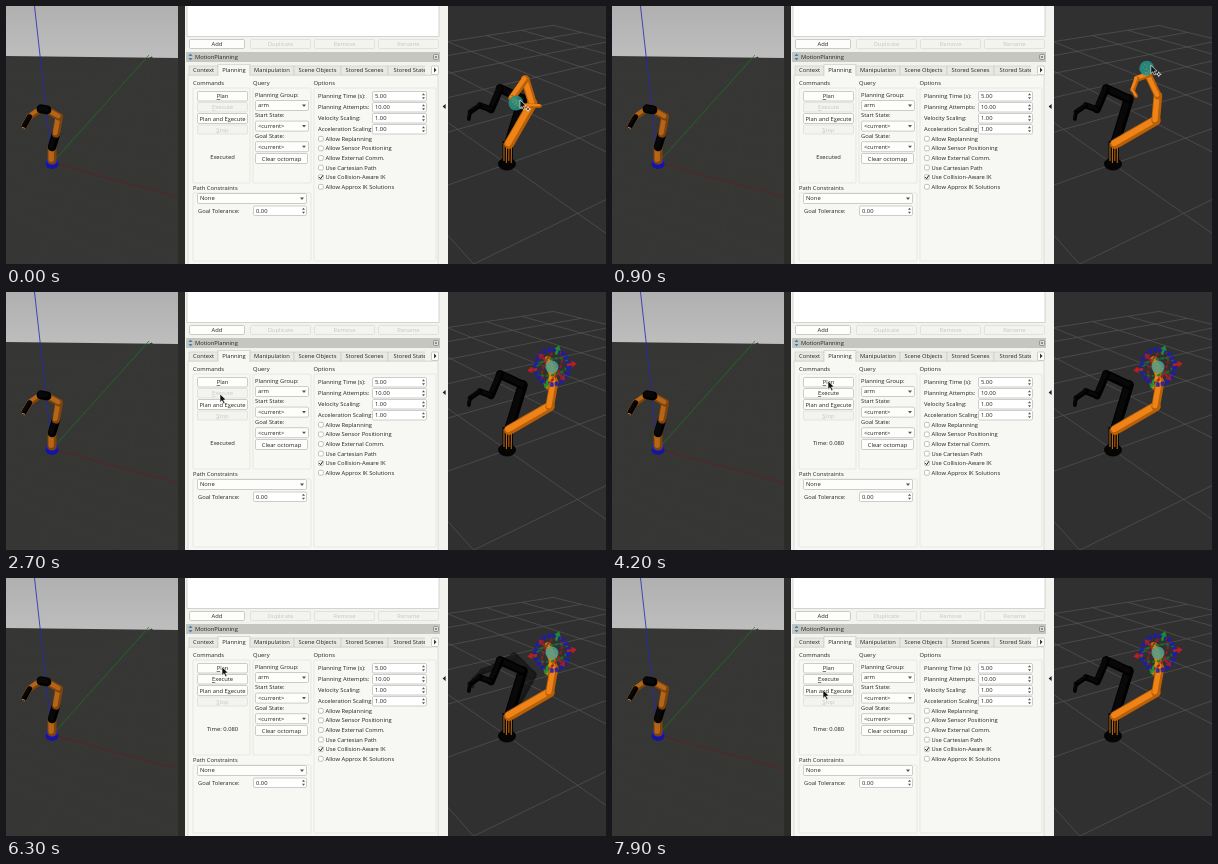
An HTML page that plays this animation: 600 by 258 pixels, repeating every 8 s.

```html
<!DOCTYPE html>
<html lang="en">
<head>
<meta charset="utf-8">
<title>Motion planning</title>
<style>
html, body { margin: 0; width: 100%; height: 100%; overflow: hidden; background: #303030; }
svg { display: block; width: 600px; height: 258px; }
text { font: 500 5.8px "Open Sans", "Noto Sans", sans-serif; white-space: pre; }
.u { text-decoration: underline; text-decoration-thickness: .5px; }
</style>
</head>
<body>
<svg viewBox="0 0 600 258">
  <linearGradient id="sky" x2="0" y2="1"><stop stop-color="#b0b0b0"/><stop offset="1" stop-color="#bebebe"/></linearGradient>
  <g id="fixed"></g><g id="moving"></g>
</svg>
<script>
const LOOP = 8000, INK = '#222', DIM = '#c6c6c2', EDGE = '#b9b9b4', PANE = '#f7f7f3';

// Basic shapes
const rect = (x, y, w, h, fill, more = '') =>
  `<rect x="${x}" y="${y}" width="${w}" height="${h}" fill="${fill}" ${more}/>`;
const line = (x1, y1, x2, y2, stroke, width = 1) =>
  `<path d="M${x1} ${y1}L${x2} ${y2}" stroke="${stroke}" stroke-width="${width}" fill="none"/>`;
const oval = (x, y, rx, ry, fill, more = '') =>
  `<ellipse cx="${x}" cy="${y}" rx="${rx}" ry="${ry}" fill="${fill}" ${more}/>`;
const shape = (d, fill, more = '') => `<path d="${d}" fill="${fill}" ${more}/>`;
const place = (x, y, content, turn = 0) => `<g transform="translate(${x} ${y}) rotate(${turn})">${content}</g>`;
const label = (s, x, y, fill = INK, anchor = 'start') =>
  `<text x="${x}" y="${y + 2}" fill="${fill}" text-anchor="${anchor}">${s}</text>`;

// Widgets
const box = (x, y, w, h, fill = '#fdfdfb', stroke = EDGE) =>
  rect(x + .5, y + .5, w - 1, h - 1, fill, `stroke="${stroke}" stroke-width=".7" rx="1.2"`);
const mnemonic = s => s.replace(/_(.)/, '<tspan class="u">$1</tspan>');
const button = (s, x, y, w, h, on = true, fill = on ? '#fdfdfb' : '#f3f3ef') =>
  box(x, y, w, h, fill, on ? EDGE : '#dadad6') + label(mnemonic(s), x + w / 2, y + h / 2, on ? INK : DIM, 'middle');
const combo = (s, x, y, w) => box(x, y, w, 11) + label(s, x + 3, y + 5.4) +
  shape(`M${x + w - 7} ${y + 4.5}h4l-2 2.4z`, '#555');
const spin = (s, x, y, w) => box(x, y, w, 10.5, '#fff') + label(s, x + 3, y + 5.2) +
  shape(`M${x + w - 5} ${y + 4.2}h3l-1.5 -2zM${x + w - 5} ${y + 6.3}h3l-1.5 2z`, '#555');
const group = (x, y, w, h) => rect(x, y, w, h, 'none', 'stroke="#e0e0dc" stroke-width=".7" rx="1"');

// Forward kinematics: link lengths and screen headings in degrees give the joints
function chain(x, y, lengths, headings) {
  return [[x, y], ...lengths.map((length, i) => {
    const a = headings[i] * Math.PI / 180;
    return [x += length * Math.cos(a), y -= length * Math.sin(a)];
  })];
}
const ORANGE = ['#b85f08', '#ee8418'], RUST = ['#7c430c', '#b5651a'], BLACK = ['#000', '#080808'];
const link = (a, b, [dark, light], width) =>
  line(...a, ...b, dark, width) + line(a[0] - .8, a[1] - .8, b[0] - .8, b[1] - .8, light, width * .6);
const links = (joints, colors, width, taper, from = 0) => '<g stroke-linecap="round">' + joints.slice(1).map((p, i) =>
  link(joints[i], p, colors[i % colors.length], width - taper * i)).join('') + '</g>';

const LENGTHS = [47, 25, 23, 12, 12, 7];
const arm = (headings, color) => links(chain(503, 138, LENGTHS, headings), [color], 10, 1.3);

// Perspective floor around the right robot
function floorGrid() {
  const yaw = .62, far = 5, project = (x, y) => {
    const u = x * Math.cos(yaw) - y * Math.sin(yaw), v = x * Math.sin(yaw) + y * Math.cos(yaw);
    const depth = 4 + v * .87;
    return depth > .5 && [501 + 400 * u / depth, 158 - 200 * v / depth];
  };
  let d = '';
  for (let k = -far; k <= far; k++) for (const swap of [0, 1]) {
    let pen = 'M';
    for (let s = -far; s <= far; s += .25) {
      const p = swap ? project(s, k) : project(k, s);
      if (p) { d += pen + p.map(n => n.toFixed(1)); pen = 'L'; }
    }
  }
  return shape(d, 'none', 'stroke="#5c5c5c" stroke-width=".6"');
}

function simulator() {
  const body = chain(46, 154, [13, 14, 17, 14, 6, 14, 11], [90, 73, 80, 150, 170, 215, 240]);
  const [tipX, tipY] = body[body.length - 1];
  let s = rect(0, 0, 172, 53, 'url(#sky)') + shape('M0 50L172 52V258H0z', '#363635');
  for (let i = 1; i < 9; i++)
    s += line(146, 51, i * 75 - 420, 258, '#3b3b3b', .5) + line(-339, 50, 172, 50 + i * 29, '#3b3b3b', .5);
  s += line(46, 157, 172, 191, '#6c1a20', .7) + line(46, 157, 143, 49, '#1b7a1b', .7) + line(28.5, 0, 46, 157, '#2626b4', .8);
  s += oval(46, 158, 6.5, 5, '#1515a0') + oval(46, 155, 6, 3.5, '#2020c8');
  return s + links(body, [RUST, BLACK, RUST], 9, .5) + links(body.slice(4, 6), [BLACK], 9, 0) +
    links(body.slice(6), [BLACK], 5, 0) + line(tipX - 2, tipY + 1, tipX + 1, tipY + 2, '#999', 1) +
    rect(172, 0, 7, 258, '#2b2b29');
}

function panel() {
  let s = rect(179, 0, 263, 258, '#f2f2ee') + rect(181, -2, 252, 32.5, '#fff', 'stroke="#c4c4bf" stroke-width=".7"');
  s += button('Add', 183, 33, 56, 10);
  ['Duplicate', 'Remove', 'Rename'].forEach((name, i) => s += button(name, 244 + i * 64, 33, 61, 10, false));
  s += rect(180, 46, 254, 10, '#c6c6c1') + label('MotionPlanning', 189, 50.7) +
    shape('M184.5 47.5l2 2.5h-4zM184.5 54.5l2 -2.5h-4z', '#3f7fb5') +
    box(427, 48, 6, 6, '#e8e8e4', '#777') + label('×', 430, 50.9, INK, 'middle');

  s += rect(182, 69, 250, 195, PANE, 'stroke="#d2d2cd" stroke-width=".7"');
  let x = 183;
  ['Context', 'Planning', 'Manipulation', 'Scene Objects', 'Stored Scenes', 'Stored State'].forEach((name, i) => {
    const w = 8 + 3 * name.length, on = i == 1;
    s += rect(x, on ? 58.5 : 60, w, on ? 11 : 9, on ? PANE : '#e9e9e4', 'stroke="#c9c9c4" stroke-width=".6"') +
      label(name, x + w / 2, 64, INK, 'middle');
    if (on) s += rect(x + .4, 69, w - .8, 1, PANE);
    x += w;
  });
  s += rect(419, 58, 14, 10.5, '#f2f2ee') + box(425, 59.5, 8, 9.5) + shape('M428 61.5v5l2.5 -2.5z', '#333');

  s += group(187, 82, 57, 95) + group(247, 82, 58, 95) + group(308, 82, 122, 173) + group(187, 187, 118, 68);
  s += label('Commands', 187, 76.5) + label('Query', 247, 76.5) + label('Options', 307.5, 76.5) +
    label('Path Constraints', 187, 181.5) + button('_Stop', 191, 118.5, 51, 10, false);
  [['Planning Group:', 'arm'], ['Start State:', '&lt;current&gt;'], ['Goal State:', '&lt;current&gt;']]
    .forEach(([name, value], i) => s += label(name, 249, 88.5 + i * 20.6) + combo(value, 249, 94 + i * 20.6, 54));
  s += button('Clear octomap', 249, 147, 53, 11) + combo('None', 191, 187, 110) +
    label('Goal Tolerance:', 192, 204.7) + spin('0.00', 247, 199.5, 54);
  [['Planning Time (s):', '5.00'], ['Planning Attempts:', '10.00'], ['Velocity Scaling:', '1.00'], ['Acceleration Scaling:', '1.00']]
    .forEach(([name, value], i) => s += label(name, 312, 90 + i * 11) + spin(value, 366, 85 + i * 11, 55));
  ['Allow Replanning', 'Allow Sensor Positioning', 'Allow External Comm.', 'Use Cartesian Path',
    'Use Collision-Aware IK', 'Allow Approx IK Solutions'].forEach((name, i) => {
    const y = 132.7 + i * 9.6;
    s += box(312, y - 2.8, 5.8, 5.8, '#fff', '#aaa') + label(name, 319.5, y);
    if (i == 4) s += shape(`M313.3 ${y}l1.3 1.7l2.3 -3.5`, 'none', 'stroke="#222"');
  });
  return s + shape('M439.6 98v5l-3 -2.5z', '#222');
}

const mix = (a, b, k) => a.map((v, i) => v + (b[i] - v) * k);
// Linear keyframes: [time, values]
function key(t, frames) {
  let i = 0;
  while (i < frames.length - 2 && t >= frames[i + 1][0]) i++;
  const [[t0, a], [t1, b]] = frames.slice(i, i + 2);
  return mix(a, b, Math.min(1, Math.max(0, (t - t0) / (t1 - t0))));
}

// Arm poses as link headings
const CURRENT = [73, 155, 247, 159, 215, 260];
const GOAL = [30, 80, 105, 300, 250, 250];
const FOLDED = [60, 107, 235, 320, 360, 360], RAISED = [30, 85, 115, 200, 250, 300];
const ELBOW_UP = [72, 302, 70, 85, 110, 185];
const RELEASE = 2200, FLIP = 1000, SETTLE = 1900, PLAN = 3400, PLANNED = 3700, ARRIVE = 7700;

const HANDLE = [[0, [510, 97]], [500, [534, 71]], [1000, [535, 60]], [1600, [543, 69]], [1800, [546, 75]]];
const CLICKS = [[RELEASE, [551, 73]], [2700, [214, 102]], [3100, [216, 89]], [6700, [216, 89]], [7100, [211, 112]]];

function rings() {
  const ring = (rx, ry, color, width, turn) => place(0, 0,
    oval(0, 0, rx, ry, 'none', `stroke="${color}" stroke-width="${width}" stroke-dasharray="3.4 1.6"`), turn);
  const arrow = (r, color, turn) => place(0, 0,
    line(r - 5, 0, r, 0, color, 2.4) + shape(`M${r} -3.4v6.8l5 -3.4z`, color), turn);
  let s = ring(8, 17, '#9c1a24', 2, 24) + ring(17, 8, '#17752c', 2, -14) + ring(16.5, 17.5, '#1c1cb8', 4.5, 0);
  for (const side of [0, 180])
    s += arrow(20, '#d01c24', side - 8) + arrow(18, '#18a030', side - 72) + arrow(14, '#b01c30', side + 45);
  return `<g opacity=".85">${s}</g>`;
}

function marker(idle) {
  let s = oval(0, 0, idle ? 6.5 : 7.5, idle ? 6.5 : 7.5, idle ? '#4f9d8c' : '#239184', 'opacity=".88"');
  for (let i = 0; i < 9; i++) {
    const a = i * 2.4, r = 1.7 * Math.sqrt(i);
    s += oval(r * Math.cos(a), r * Math.sin(a), .7, .5, '#b49a58', 'opacity=".65"');
  }
  return (idle ? rings() : '') + s;
}

function column() {
  let s = oval(501, 158, 9, 6.5, '#050505') + rect(496.5, 135, 10.5, 24, '#060606');
  for (let i = 0; i < 4; i++) s += line(498 + i * 2.5, 137, 498 + i * 2.4, 155 + i % 2 * 2, '#c46c10', 1);
  return s;
}

const arrowCursor = shape('M0 0v8.4l2 -1.8l1.5 3.2l1.5 -.7l-1.5 -3l2.6 -.3z', '#111', 'stroke="#fff" stroke-width=".6"');
const dragCursor = shape('M0 -3l1 2l2 1l-2 1l-1 2l-1 -2l-2 -1l2 -1z', '#ddd') + oval(0, 0, .9, .9, '#222');

function scene(t) {
  const planned = t >= PLANNED, idle = t >= RELEASE, flipped = t >= FLIP && t < SETTLE;
  const status = planned ? 'Time: 0.080' : t < PLAN ? 'Executed' : 'Planning...';
  let s = button('_Plan', 191, 85, 51, 10.5, true, t == PLAN ? '#d5d5d0' : undefined) +
    button('_Execute', 191, 96, 51, 10.5, planned) +
    button('Plan and E_xecute', 191, 107, 51, 11) + label(status, 216.5, 150.5, INK, 'middle');

  if (planned) {
    const progress = Math.min(1, (t - PLANNED) / (ARRIVE - PLANNED));
    s += `<g opacity=".5">${arm(mix(CURRENT, GOAL, progress ** 3), BLACK)}</g>`;
  }
  const current = arm(CURRENT, BLACK);
  const dragged = flipped ? ELBOW_UP : t < FLIP ? key(t, [[0, FOLDED], [500, RAISED]]) : GOAL;
  const wanted = arm(dragged, ORANGE);
  s += flipped ? wanted + current + column() : current + column() + wanted;

  const [x, y] = key(t, HANDLE);
  s += place(x, y, marker(idle));
  const [px, py] = idle ? key(t, CLICKS) : [x + 4, y - 3];
  return s + place(px, py, arrowCursor) + (idle ? '' : place(px + 8, py + 9, dragCursor));
}

document.getElementById('fixed').innerHTML =
  rect(442, 0, 158, 258, '#303030') + floorGrid() + simulator() + panel();
const moving = document.getElementById('moving');
let shown = -1;
function frame(now) {
  const t = Math.floor(now % LOOP / 100) * 100;
  if (t !== shown) moving.innerHTML = scene(shown = t);
  requestAnimationFrame(frame);
}
frame(performance.now());
</script>
</body>
</html>
```
